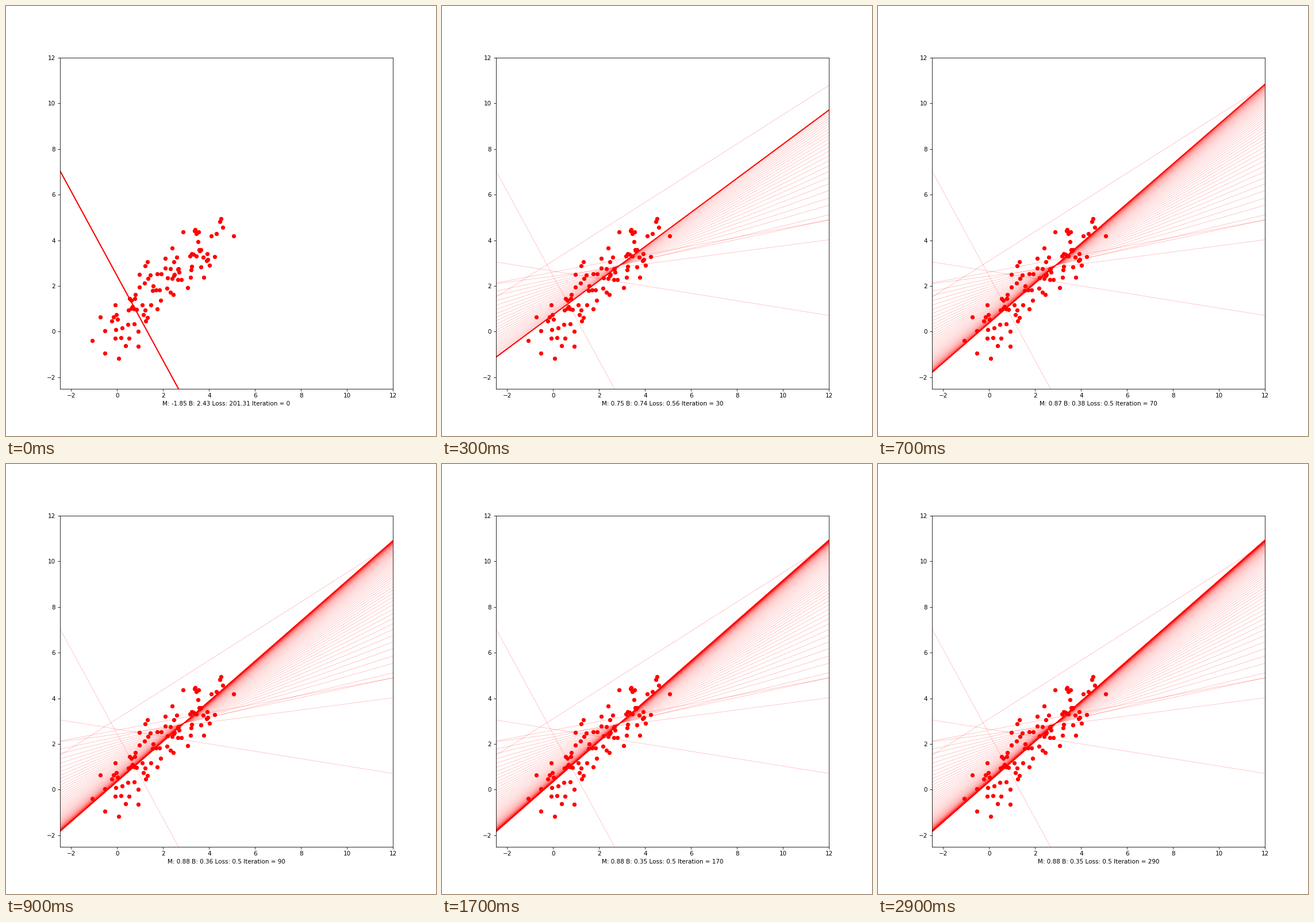
A matplotlib script for the animation above (3000 ms loop, 748 px wide and 748 px high).

```python
import numpy as np
import matplotlib.pyplot as plt
from matplotlib.animation import FuncAnimation
from matplotlib.collections import LineCollection

FRAMES, STEP = 30, 10
LOW, HIGH = -2.5, 12
POINTS = 100
SLOPE, OFFSET, NOISE = 0.8812, 0.351, 0.502    # best fit and its mean squared error
X_MEAN, X_STD = 1.98917, 1.45462


def make_points(seed=4):
    """Noisy diagonal cloud, adjusted to the wanted mean, spread and best fit."""
    rng = np.random.default_rng(seed)
    t = np.linspace(0, 4.4, POINTS)
    x = t + rng.uniform(-0.65, 0.65, POINTS)
    y = t + rng.uniform(-0.9, 0.9, POINTS)
    x = X_MEAN + X_STD * (x - x.mean()) / x.std()
    rest = y - np.polyval(np.polyfit(x, y, 1), x)
    return x, SLOPE * x + OFFSET + rest * np.sqrt(NOISE) / rest.std()


def descend(x, y, count, rate=0.1):
    """Gradient descent on the mean squared error: (m, b, loss) per step."""
    m = b = 5.0
    path = []
    for _ in range(count):
        err = m * x + b - y
        m -= rate * 2 * np.mean(err * x)
        b -= rate * 2 * np.mean(err)
        path.append((m, b, np.mean(err ** 2)))
    return path


xs, ys = make_points()
path = descend(xs, ys, FRAMES * STEP)
ends = np.array([LOW - 0.5, HIGH + 0.5])
segments = [np.column_stack([ends, m * ends + b]) for m, b, _ in path]

fig = plt.figure(figsize=(10, 10), dpi=74.8)
ax = fig.add_subplot()
ax.set_xlim(LOW, HIGH)
ax.set_ylim(LOW, HIGH)
ax.plot(xs, ys, "ro")

trail = LineCollection([], colors="red", linewidths=0.2)
ax.add_collection(trail, autolim=False)
current, = ax.plot([], [], color="red", lw=2)


def update(frame):
    i = frame * STEP
    m, b, loss = (round(float(v), 2) for v in path[i])
    trail.set_segments(segments[:i])
    current.set_data(*segments[i].T)
    ax.set_xlabel(f"M: {m} B: {b} Loss: {loss} Iteration = {i}")
    return trail, current


anim = FuncAnimation(fig, update, frames=FRAMES, interval=100,
                     init_func=lambda: update(0), repeat=True, repeat_delay=0)
plt.show()
```
